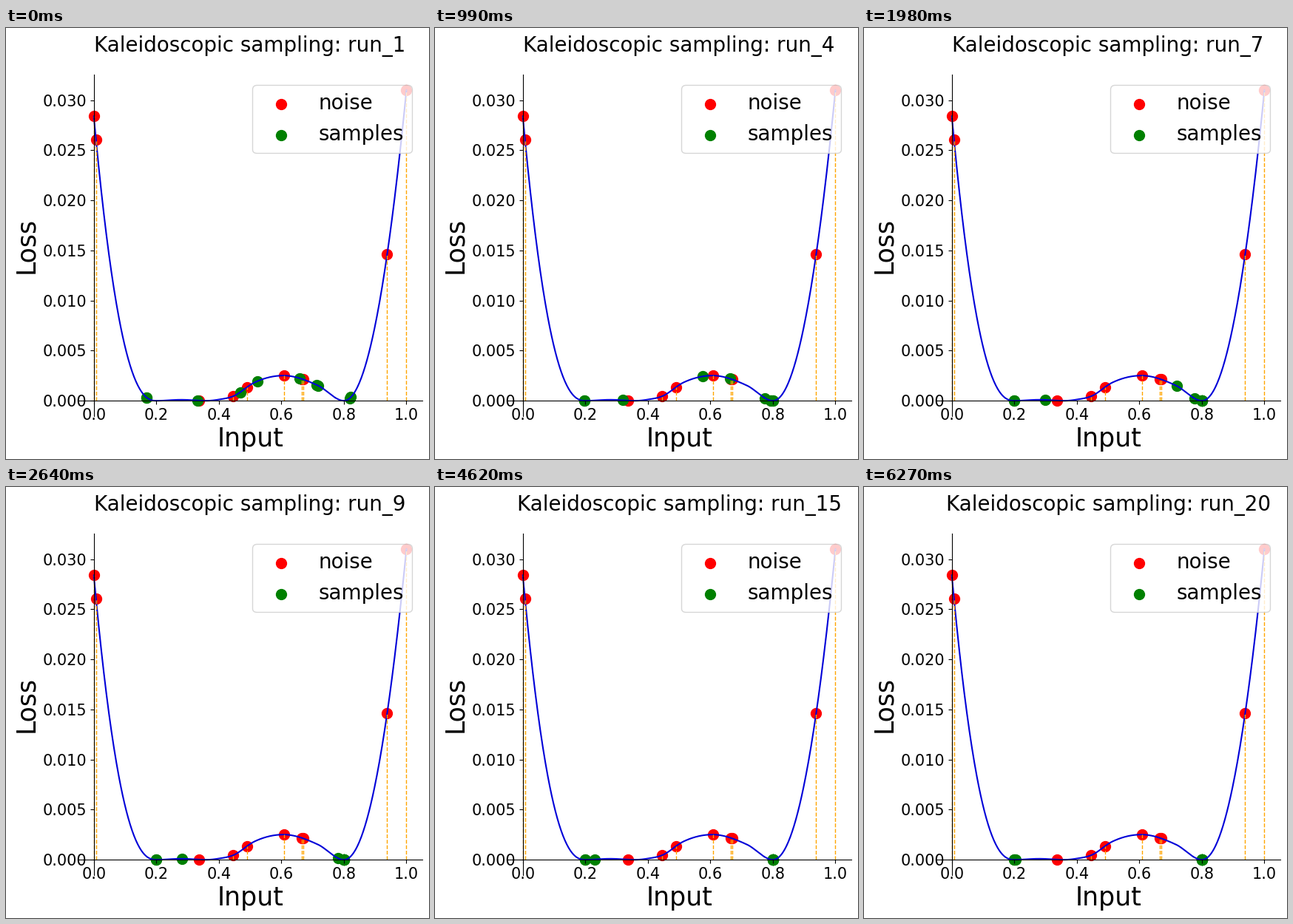
A matplotlib script for the animation above (6600 ms loop, 572 by 583 pixels).

```python
import numpy as np
import matplotlib.pyplot as plt
from matplotlib.animation import FuncAnimation

W, H, DPI = 572, 583, 100
FRAMES, INTERVAL = 20, 330

LOW, RIDGE, HIGH = .2, .36, .8   # two minima and the point that divides them
NOISE = np.array([0, .007, .336, .445, .49, .6085, .666, .671, .9385, 1])

HUMP_X = np.array([.36, .4, .445, .515, .61, .717, .8])
HUMP_Y = np.array([0, .12, .44, 1.84, 2.51, 1.52, 0]) * 1e-3


def hermite(x, kx, ky):
    slope = np.gradient(ky, kx)
    slope[0] = slope[-1] = 0
    i = np.clip(np.searchsorted(kx, x) - 1, 0, len(kx) - 2)
    h = kx[i + 1] - kx[i]
    t = (x - kx[i]) / h
    return ((1 + 2 * t) * (1 - t) ** 2 * ky[i] + t * (1 - t) ** 2 * h * slope[i]
            + t * t * (3 - 2 * t) * ky[i + 1] + t * t * (t - 1) * h * slope[i + 1])


def loss(x):
    left = .0284 * np.clip((LOW - x) / LOW, 0, None) ** 2.4
    right = .031 * np.clip((x - HIGH) / (1 - HIGH), 0, None) ** 2.04
    ripple = 1e-4 * np.sin(np.pi * (np.clip(x, LOW, RIDGE) - LOW) / (RIDGE - LOW)) ** 2
    return left + right + ripple + hermite(np.clip(x, RIDGE, HIGH), HUMP_X, HUMP_Y)


def shrink(gap, limit, scale):
    """Remaining distance to a minimum after one step on a steep wall."""
    return limit * (1 - np.exp(-gap / scale))


def push(x, goal, speed):
    """Step from the ridge towards a minimum: slow, fast, slow."""
    u = np.clip((x - RIDGE) / (goal - RIDGE), 0, 1)
    return x + speed * np.clip(np.sin(np.pi * u ** 1.3), 0, None) ** .75


def advance(x):
    return np.select(
        [x < LOW, x < RIDGE, x < HIGH],
        [LOW - shrink(LOW - x, .033, .06), push(x, LOW, -.0095), push(x, HIGH, .05)],
        HIGH + shrink(x - HIGH, .027, .11))


def samples(run):
    x = NOISE
    for _ in range(run):
        x = advance(x)
    return np.column_stack([x, loss(x)])


fig = plt.figure(figsize=(W / DPI, H / DPI), dpi=DPI, facecolor="white")
ax = fig.add_axes([97.6 / W, 57.8 / H, 465 / W, 462 / H])
ax.set_xlim(-.05, 1.05)
ax.set_ylim(-.00155, .03255)
ax.set_xticks(np.arange(0, 1.1, .2))
ax.set_yticks(np.arange(0, .031, .005))
ax.tick_params(labelsize=15)
for side in ("left", "bottom"):
    ax.spines[side].set_position("zero")
for side in ("right", "top"):
    ax.spines[side].set_visible(False)
ax.set_xlabel("Input", fontsize=25)
ax.set_ylabel("Loss", fontsize=25)
title = ax.set_title("", fontsize=20, y=1.05)

grid = np.linspace(0, 1, 500)
ax.plot(grid, loss(grid), color="#0000d8", lw=1.5)
ax.vlines(NOISE, 0, loss(NOISE), color="orange", linestyles="dashed", lw=1)
ax.scatter(NOISE, loss(NOISE), s=100, color="red", label="noise")
dots = ax.scatter(NOISE, loss(NOISE), s=100, color="green", label="samples")
ax.legend(loc="upper right", fontsize=20)


def draw(frame):
    run = frame + 1
    dots.set_offsets(samples(run))
    title.set_text(f"Kaleidoscopic sampling: run_{run}")
    return dots, title


anim = FuncAnimation(fig, draw, frames=FRAMES, interval=INTERVAL,
                     init_func=lambda: draw(0), repeat=True, repeat_delay=0)
plt.show()
```
